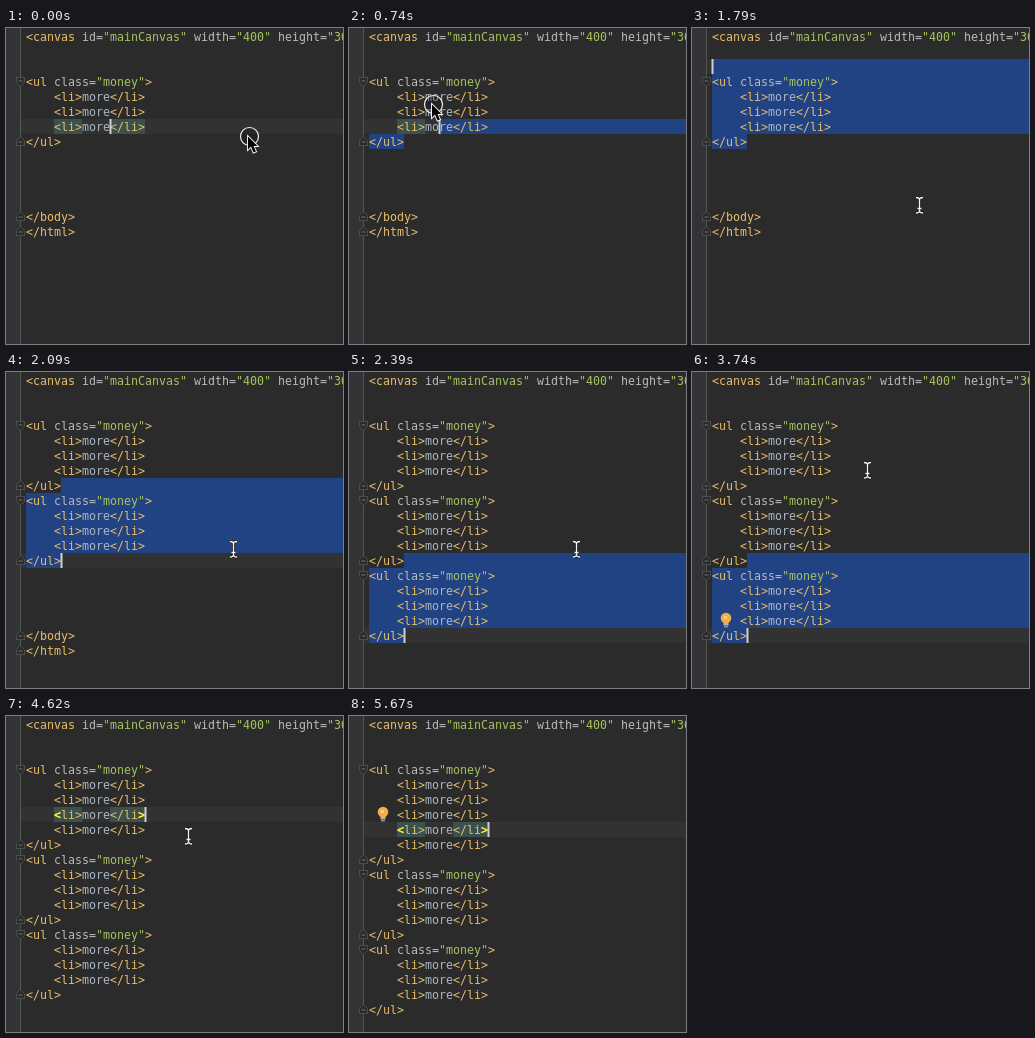
These frames come from a looping animation (337 by 316 pixels, 5.81 s). An HTML page with a canvas:

```html
<!DOCTYPE html>
<html lang="en">
<head>
<meta charset="utf-8">
<title>Editing a list</title>
<style>
  html, body { margin: 0; width: 100%; height: 100%; overflow: hidden; background: #2b2b2b; }
  canvas { display: block; }
</style>
</head>
<body>
<canvas id="stage" width="337" height="316"></canvas>
<script>
const W = 337, H = 316, LOOP = 5810;
const LEFT = 20, CHAR = 7, LINE = 15, GUTTER = 14;
const ctx = document.getElementById('stage').getContext('2d');

const COLORS = {
  back: '#2b2b2b', gutter: '#313335', rule: '#555555', caretRow: '#323232',
  selection: '#214283', match: '#3b514d', bracket: '#ffef28', caret: '#d0d0d0',
  tag: '#e8bf6a', attribute: '#bababa', string: '#a5c261', text: '#a9b7c6'
};

// lists: items per list; caret and anchor: [row, column]; tags: row whose tags are matched
const EDITS = [
  { at: 0, lists: [3], caret: [6, 12], tags: 6 },
  { at: 150, lists: [3], caret: [7, 5], tags: 6 },
  { at: 740, lists: [3], caret: [6, 10], anchor: [7, 5], tags: 6 },
  { at: 890, lists: [3], caret: [5, 9], anchor: [7, 5] },
  { at: 1040, lists: [3], caret: [3, 9], anchor: [7, 5] },
  { at: 1190, lists: [3], caret: [2, 0], anchor: [7, 5] },
  { at: 2090, lists: [3, 3], caret: [12, 5], anchor: [7, 5] },
  { at: 2390, lists: [3, 3, 3], caret: [17, 5], anchor: [12, 5] },
  { at: 2990, lists: [3, 3, 3], caret: [17, 5], anchor: [12, 5], bulb: true, blink: true },
  { at: 3440, lists: [3, 3, 3], caret: [17, 5], anchor: [12, 5], bulb: true },
  { at: 3890, lists: [3, 3, 3], caret: [5, 17] },
  { at: 4040, lists: [3, 3, 3], caret: [5, 17], tags: 5, brackets: true },
  { at: 4330, lists: [4, 3, 3], caret: [6, 17], tags: 6, brackets: true },
  { at: 4630, lists: [5, 3, 3], caret: [7, 17], tags: 7, brackets: true },
  { at: 5220, lists: [5, 3, 3], caret: [7, 17], tags: 7, brackets: true, bulb: true, blink: true },
  { at: 5670, lists: [5, 3, 3], caret: [7, 17], tags: 7, brackets: true, bulb: true }
];

const pointer = (at, x, y, draw) => ({ at, x, y, draw });
const POINTER = [
  pointer(0, 243, 108, drawPress), pointer(150, 242, 124, drawPress),
  pointer(300, 212, 122, drawPress), pointer(450, 150, 114, drawPress),
  pointer(600, 98, 100, drawPress), pointer(740, 84, 76, drawPress),
  pointer(890, 82, 58, drawPress), pointer(1040, 81, 48, drawPress),
  pointer(1190, 81, 43, drawPress), pointer(1340, 81, 37, drawPress),
  pointer(1640, 160, 112, drawBeam), pointer(1790, 227, 177, drawBeam),
  pointer(3140, 223, 171, drawBeam), pointer(3290, 208, 147, drawBeam),
  pointer(3440, 190, 120, drawBeam), pointer(3590, 178, 104, drawBeam),
  pointer(3740, 175, 98, drawBeam), pointer(3890, 175, 96, drawPress),
  pointer(4040, 175, 97, drawBeam), pointer(4180, 175, 96, drawBeam),
  pointer(4330, 176, 100, drawBeam), pointer(4480, 182, 120, drawBeam),
  pointer(4630, 194, 165, drawBeam), pointer(4780, 210, 225, drawBeam),
  pointer(4930, 222, 275, drawBeam), pointer(5070, 229, 302, drawBeam),
  pointer(5220, 0, 0, () => {})
];

const current = (steps, t) => steps.findLast(step => step.at <= t);
const colX = col => LEFT + col * CHAR;
const rowY = row => 1 + row * LINE;

function rect(color, x, y, w, h) {
  ctx.fillStyle = color;
  ctx.fillRect(x, y, w, h);
}

function polygon(points, fill, stroke, width = 1) {
  ctx.beginPath();
  points.forEach(([x, y]) => ctx.lineTo(x, y));
  ctx.closePath();
  ctx.lineWidth = width;
  ctx.strokeStyle = stroke;
  ctx.fillStyle = fill;
  ctx.stroke();
  ctx.fill();
}

function buildLines(lists) {
  const blocks = lists.flatMap(count => [
    '<ul class="money">',
    ...Array(count).fill('    <li>more</li>'),
    '</ul>'
  ]);
  return ['<canvas id="mainCanvas" width="400" height="300">', '', '',
    ...blocks, '', '', '', '', '</body>', '</html>'];
}

function drawText(line, row) {
  const tokens = /(<\/?\w+|>)|("[^"]*")|(\w+=)|\w+/g;
  for (const match of line.matchAll(tokens)) {
    const [text, tag, string, attribute] = match;
    ctx.fillStyle = tag ? COLORS.tag : string ? COLORS.string
      : attribute ? COLORS.attribute : COLORS.text;
    ctx.fillText(text, colX(match.index), rowY(row) + 12);
  }
}

function drawSelection([fromRow, fromCol], [toRow, toCol]) {
  for (let row = fromRow; row <= toRow; row++) {
    const x = colX(row === fromRow ? fromCol : 0);
    const end = row === toRow ? colX(toCol) : W;
    rect(COLORS.selection, x, rowY(row), end - x, LINE);
  }
}

function drawMatch(row) {
  rect(COLORS.match, colX(4), rowY(row), 4 * CHAR, LINE);
  rect(COLORS.match, colX(12), rowY(row), 5 * CHAR, LINE);
}

function drawBrackets(row) {
  ctx.save();
  ctx.font = 'bold ' + ctx.font;
  ctx.fillStyle = COLORS.bracket;
  ctx.fillText('<', colX(4), rowY(row) + 12);
  ctx.fillText('>', colX(16), rowY(row) + 12);
  ctx.restore();
}

// Fold marker: a small house shape, upside down where a block opens.
function drawFold(row, opens) {
  ctx.save();
  ctx.translate(GUTTER + .5, rowY(row) + 7.5);
  if (opens) ctx.scale(1, -1);
  polygon([[-4, 4], [4, 4], [4, -1], [0, -5], [-4, -1]], COLORS.back, '#6e6e6e');
  rect('#6e6e6e', -2, 0, 4, 1);
  ctx.restore();
}

function drawBulb(row) {
  const y = rowY(row);
  ctx.fillStyle = '#f2ae45';
  ctx.beginPath();
  ctx.arc(34, y + 5, 5.3, .25 * Math.PI, .75 * Math.PI, true);
  ctx.lineTo(32, y + 11);
  ctx.lineTo(36, y + 11);
  ctx.fill();
  rect('#f9d08a', 32, y + 3, 3, 3);
  rect('#b5b5b5', 31.5, y + 11, 5, 1.5);
  rect('#8c8c8c', 32, y + 13, 4, 1.5);
}

function drawPress(x, y) {
  ctx.beginPath();
  ctx.arc(x + .5, y + .5, 9, 0, 2 * Math.PI);
  ctx.fillStyle = 'rgba(0, 0, 0, .2)';
  ctx.fill();
  ctx.lineWidth = 1.2;
  ctx.strokeStyle = '#f0f0f0';
  ctx.stroke();
  const arrow = [[0, 0], [0, 13], [3, 10], [5.5, 16], [8, 15], [5.5, 9.5], [9.5, 9.5]];
  polygon(arrow.map(([dx, dy]) => [x - 1 + dx, y + .5 + dy]), '#000', '#fff', 1.8);
}

function drawBeam(x, y) {
  const strokes = [['#1c1c1c', 3], ['#f4f4f4', 1.3]];
  for (const [color, width] of strokes) {
    ctx.strokeStyle = color;
    ctx.lineWidth = width;
    ctx.beginPath();
    ctx.moveTo(x - 3, y - 7.5);
    ctx.quadraticCurveTo(x + .5, y - 7.5, x + .5, y - 5);
    ctx.lineTo(x + .5, y + 5.5);
    ctx.quadraticCurveTo(x + .5, y + 8, x - 3, y + 8);
    ctx.moveTo(x + 4, y - 7.5);
    ctx.quadraticCurveTo(x + .5, y - 7.5, x + .5, y - 5);
    ctx.moveTo(x + .5, y + 5.5);
    ctx.quadraticCurveTo(x + .5, y + 8, x + 4, y + 8);
    ctx.moveTo(x - 1.5, y + 3.5);
    ctx.lineTo(x + 2.5, y + 3.5);
    ctx.stroke();
  }
}

function draw(t) {
  const { lists, caret, anchor, tags, brackets, bulb, blink } = current(EDITS, t);
  const lines = buildLines(lists);
  const [row, col] = caret;

  rect(COLORS.back, 0, 0, W, H);
  rect(COLORS.gutter, 0, 0, GUTTER, H);
  rect(COLORS.caretRow, GUTTER, rowY(row), W, LINE);
  rect(COLORS.rule, GUTTER, 0, 1, H);
  if (tags) drawMatch(tags);
  if (anchor) drawSelection(...[caret, anchor].sort((a, b) => a[0] - b[0]));

  ctx.font = '11.63px "DejaVu Sans Mono", monospace';
  lines.forEach((line, i) => {
    drawText(line, i);
    if (line.startsWith('<ul')) drawFold(i, true);
    if (line.startsWith('</')) drawFold(i, false);
  });
  if (brackets) drawBrackets(tags);
  if (!blink) rect(COLORS.caret, colX(col) - .5, rowY(row), 2, LINE);
  if (bulb) drawBulb(row - 1);

  const mouse = current(POINTER, t);
  mouse.draw(mouse.x, mouse.y);
}

function tick() {
  draw(performance.now() % LOOP);
  requestAnimationFrame(tick);
}
tick();
</script>
</body>
</html>
```
